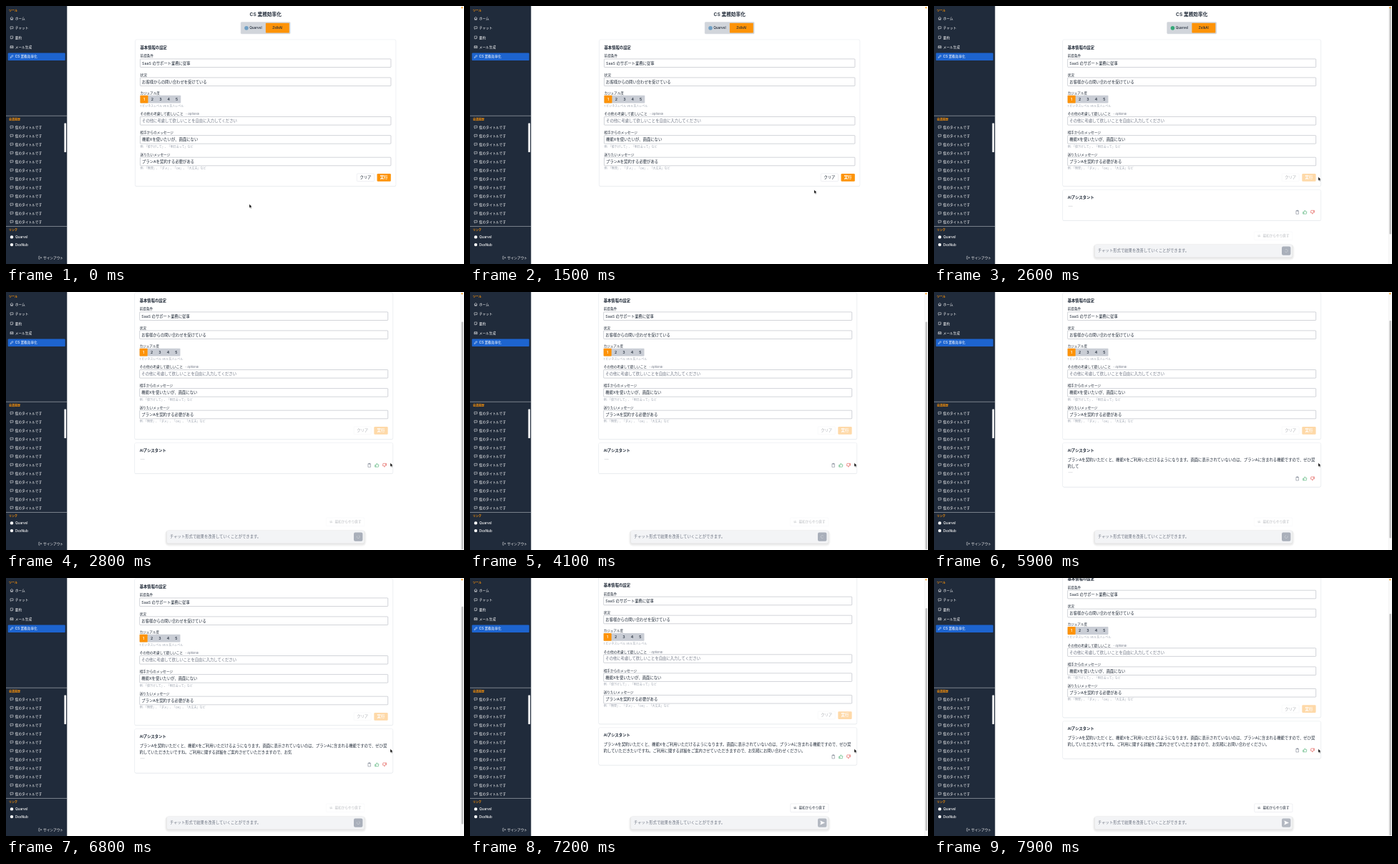
An HTML page for the animation above (8000 ms loop, 640x360 px).

```html
<!DOCTYPE html>
<html lang="ja">
<head>
<meta charset="utf-8">
<title>CS 業務効率化</title>
<style>
html, body { margin: 0; width: 100%; height: 100%; overflow: hidden; background: #fff; }
svg { display: block; width: 100vw; height: 100vh; font-family: Inter, "Noto Sans CJK JP", sans-serif; }
text { white-space: pre; }
</style>
</head>
<body>
<svg viewBox="0 0 640 360" xmlns="http://www.w3.org/2000/svg">
  <g id="page"><g id="form"></g><g id="answer"></g></g>
  <g id="chat"></g>
  <g id="scrollbar"></g>
  <g id="sidebar"></g>
  <circle cx="637.3" cy="2.3" r="1.1" fill="#ff9500"/>
  <path id="cursor" d="M0 0V5.2L1.2 4.1 2 6 2.9 5.6 2.1 3.8H3.7Z" fill="#000" stroke="#fff" stroke-width=".35"/>
</svg>
<script>
const LOOP = 8000, SUBMIT = 2500, DONE = 7150, LINE = 28 / 3;
const INK = '#1f2937', NAVY = '#202b3b', ORANGE = '#fd9308', MUTED = '#9ca3af', EDGE = '#d7dae0';
const SMALL = 4, LABEL = 14 / 3, BODY = 16 / 3, TITLE = 20 / 3;
const ANSWER = [
  'プランAを契約いただくと、機能Xをご利用いただけるようになります。画面に表示されていないのは、プランAに含まれる機能ですので、ぜひ契',
  '約していただきたいですね。ご利用に関する詳細をご案内させていただきますので、お気軽にお問い合わせください。'
];
const TYPING = [[4250, 0], [5000, 32], [6800, 106], [7120, 119]];
const CURSOR_X = [[1300, 340], [1500, 480.5], [1700, 562], [1950, 545], [2250, 537]];
const CURSOR_Y = [[1300, 276.5], [1500, 256.5], [1700, 247], [1950, 240], [2250, 238.5]];

const el = id => document.getElementById(id);
const cache = {};
function set(id, html) {
  if (cache[id] !== html) el(id).innerHTML = cache[id] = html;
}

// y is the vertical middle of the line
const text = (x, y, str, size = BODY, fill = INK, more = '') =>
  `<text x="${x}" y="${y + size * 0.36}" font-size="${size}" fill="${fill}" ${more}>${str}</text>`;
const rect = (x, y, w, h, fill, r = 0, more = '') =>
  `<rect x="${x}" y="${y}" width="${w}" height="${h}" rx="${r}" fill="${fill}" ${more}/>`;
const outlined = (x, y, w, h, r = 1.3, stroke = EDGE, fill = '#fff') =>
  rect(x, y, w, h, fill, r, `stroke="${stroke}" stroke-width=".4"`);
const dot = (x, y, r, fill) => `<circle cx="${x}" cy="${y}" r="${r}" fill="${fill}"/>`;
const icon = (x, y, d, color = '#fff', more = '') =>
  `<path transform="translate(${x} ${y})" d="${d}" fill="none" stroke="${color}" stroke-width=".5" stroke-linejoin="round" ${more}/>`;
const card = (x, y, w, h) =>
  rect(x, y + 0.5, w, h, '#e4e6ea', 2) + outlined(x, y, w, h, 2, '#dfe2e7');
const BOLD = 'font-weight="600"', MEDIUM = 'font-weight="500"', CENTER = 'text-anchor="middle"';

const keyed = (points, t) => {
  if (t <= points[0][0]) return points[0][1];
  for (let i = 1; i < points.length; i++) {
    const [t0, a] = points[i - 1], [t1, b] = points[i];
    if (t < t1) return a + (b - a) * (t - t0) / (t1 - t0);
  }
  return points[points.length - 1][1];
};
const ease = (t, from, to) => {
  const p = Math.min(1, Math.max(0, (t - from) / (to - from)));
  return p * p * (3 - 2 * p);
};

const ICONS = {
  home: 'M-2.2 0L0-2 2.2 0M-1.5-.4V2H1.5V-.4M-.4 2V.7H.4V2',
  bubble: 'M-2-1.7H2V1H-.3L-1.4 2V1H-2Z',
  note: 'M-1.7-1.8H1.7V.8L.7 1.8H-1.7ZM.7 1.8V.8H1.7',
  mail: 'M-2-1.5H2V1.5H-2ZM-2-1L0 .4 2-1M-.9 0L-2 1.3M.9 0L2 1.3',
  pen: 'M-2 2L-1.5.5 1-2 2-1-.5 1.5ZM.3-1.3L1.3-.3',
  exit: 'M-.4-2H-1.8V2H-.4M-.5 0H2M1-1L2 0 1 1',
  clipboard: 'M-1.8-2H1.8V2.6H-1.8ZM-.8-2.6H.8V-1.5H-.8Z',
  thumb: 'M-2.7-.3H-1.5V2.4H-2.7ZM-1.5-.1L-.1-2.6Q.9-2.6.5-.7H2.6L2 2.4H-1.5',
  redo: 'M-2-.7H1.3L.4-1.6M2 .7H-1.3L-.4 1.6'
};

function sidebar() {
  const menu = [['home', 'ホーム'], ['bubble', 'チャット'], ['note', '要約'], ['mail', 'メール生成'], ['pen', 'CS 業務効率化']];
  const entry = (shape, label, y) => icon(8, y, ICONS[shape]) + text(12.8, y, label, LABEL, '#fff', MEDIUM);
  const section = (label, y) => text(4, y, label, SMALL, ORANGE, BOLD);
  const divider = y => rect(0, y, 85.3, 0.45, '#e5e7eb');
  let out = rect(0, 0, 85.3, 360, NAVY) + rect(2.7, 65.4, 80, 10.7, '#1d64cf', 1.2);
  out += section('ツール', 6.4) + section('会話履歴', 158.2) + section('リンク', 312.6);
  menu.forEach(([shape, label], i) => out += entry(shape, label, 17.2 + i * 13.33));
  out += divider(152.9) + divider(307);
  for (let i = 0; i < 12; i++) out += entry('bubble', '仮のタイトルです', 169 + i * 12);
  out += rect(81.4, 163.5, 2.7, 40.5, '#fff', 0.4);
  ['Quarvel', 'DexNub'].forEach((label, i) => {
    const y = 322.4 + i * 10.7;
    out += dot(8, y, 2.2, '#fff') + text(13, y, label, LABEL, '#fff', MEDIUM);
  });
  return out + icon(47.7, 351.2, ICONS.exit) + text(52, 351.2, 'サインアウト', LABEL, '#fff', MEDIUM);
}

function column(sent) {
  const mid = sent ? 360.2 : 362.7, width = sent ? 361 : 364.4;
  return { mid, width, left: mid - width / 2, right: mid + width / 2 };
}

function form(sent) {
  const { mid, width, left, right } = column(sent), x = left + 7;
  const label = (y, str) => text(x, y, str, LABEL);
  const hint = (y, str) => text(x, y, str, SMALL, MUTED);
  const input = (y, str, color = INK) =>
    outlined(x, y - 5.8, width - 14, 11.6, 0.8, '#8d949f') + text(x + 2.6, y, str, BODY, color);

  let out = text(mid, 11.2, 'CS 業務効率化', TITLE, INK, BOLD + CENTER);
  out += outlined(mid - 34.5, 22.6, 69, 16.2, 1.2, '#c8ccd3', '#d1d5db');
  out += rect(mid + 0.2, 23.8, 32.9, 13.7, ORANGE, 0.8);
  out += dot(mid - 26.7, 30.8, 2.8, sent ? '#36a878' : '#6f9fc4');
  out += text(mid - 22.5, 30.8, 'Quarvel', LABEL, INK, MEDIUM);
  out += text(mid + 16.6, 30.8, 'ZelkAI', LABEL, INK, MEDIUM + CENTER);

  out += card(left, 46.9, width, 204.6) + text(x, 57.6, '基本情報の設定', BODY, INK, BOLD);
  out += label(69.8, '前提条件') + input(79.7, 'SaaS のサポート業務に従事');
  out += label(96, '状況') + input(105.7, 'お客様からの問い合わせを受けている');

  out += label(121, 'カジュアル度') + rect(x, 124.8, 56.8, 10.8, '#c9cdd5', 0.8);
  out += rect(x, 124.8, 11, 10.8, ORANGE, 0.8);
  for (let i = 0; i < 5; i++)
    out += text(x + 5.5 + i * 11.4, 130.2, i + 1, BODY, i ? INK : '#fff', MEDIUM + CENTER);
  out += hint(139.5, '1:ビジネスレベル vs 5:友人レベル');

  out += label(150.7, 'その他の考慮して欲しいこと');
  out += text(x + 63.5, 150.9, '- Optional', SMALL, '#6b7280', 'font-style="italic"');
  out += input(160.3, 'その他に考慮して欲しいことを自由に入力してください', '#6b7280');
  out += label(176.6, '相手からのメッセージ') + input(186.4, '機能Xを使いたいが、画面にない');
  out += hint(196.1, '例: 「値下げして」、「明日会って」など');
  out += label(207.4, '送りたいメッセージ') + input(217, 'プランAを契約する必要がある');
  out += hint(226.7, '例: 「無理」、「ダメ」、「OK」、「大丈夫」など');

  out += `<g opacity="${sent ? 0.35 : 1}">` + outlined(right - 54.6, 233.9, 24.2, 10.8)
    + text(right - 42.5, 239.3, 'クリア', BODY, INK, CENTER)
    + rect(right - 26.4, 233.9, 19.3, 10.8, ORANGE, 1.3)
    + text(right - 16.8, 239.3, '実行', BODY, '#fff', BOLD + CENTER) + '</g>';
  return out;
}

const answerRows = (chars, done) => (chars > 0) + (chars > ANSWER[0].length) + (done ? 0 : 1);

function answer(chars, done) {
  const { left, right, width } = column(true), x = left + 7;
  const rows = answerRows(chars, done), first = ANSWER[0].length;
  const grow = (rows - 1) * LINE, iconY = 287.7 + grow;
  let out = card(left, 256.4, width, 43 + grow) + text(x, 267, 'AIアシスタント', BODY, INK, BOLD);
  out += text(x, 279.6, ANSWER[0].slice(0, chars));
  if (chars > first) out += text(x, 279.6 + LINE, ANSWER[1].slice(0, chars - first));
  if (!done) for (let i = 0; i < 3; i++) out += dot(x + 2.2 + i * 2, 279.2 + grow, 0.38, '#4b5563');
  out += icon(right - 33, iconY, ICONS.clipboard, '#6b7280');
  out += icon(right - 22.4, iconY, ICONS.thumb, '#2fa35b');
  return out + `<g transform="rotate(180 ${right - 11.8} ${iconY})">`
    + icon(right - 11.8, iconY, ICONS.thumb, '#dc3a35') + '</g>';
}

function chat(done, t) {
  let out = `<g opacity="${done ? 1 : 0.3}">` + outlined(447.7, 315, 53.2, 11.7)
    + icon(454.2, 320.8, ICONS.redo, INK) + text(459.4, 320.8, '最初からやり直す', LABEL) + '</g>';
  for (let i = 5; i > 0; i--)
    out += rect(225 - i * 0.7, 333.2 - i * 0.3, 275.4 + i * 1.4, 18 + i * 1.1, '#000', 2 + i, 'opacity=".018"');
  out += rect(225, 332.5, 275.4, 18, '#f3f4f6', 2);
  out += text(229, 341.5, 'チャット形式で結果を改善していくことができます。', BODY, '#6b7280');
  out += rect(486, 335.4, 12.4, 12.4, done ? '#b4b9c2' : '#a9afba', 2);
  return out + (done
    ? '<path d="M489.3 338.6L496 341.6 489.3 344.6 490.3 341.6Z" fill="#fff"/>'
    : `<circle cx="492.2" cy="341.6" r="2" fill="none" stroke="#d1d5db" stroke-width=".6" stroke-dasharray="9.4 3.2"
        transform="rotate(${Math.round(t * 0.36) % 360} 492.2 341.6)"/>`);
}

function scrollbar(scroll, rows) {
  const height = 406 + (rows - 1) * LINE + (scroll > 50 ? 1.4 : 0);
  return rect(635.1, 0, 4.9, 360, '#fafafa') + rect(635.1, 0, 0.3, 360, '#e8e8e8')
    + rect(636.4, scroll * 360 / height + 0.7, 2.6, 360 * 360 / height - 1.4, '#c1c1c1', 1.3);
}

function draw() {
  const t = performance.now() % LOOP;
  const sent = t >= SUBMIT, done = t >= DONE;
  const chars = Math.floor(keyed(TYPING, t));
  const scroll = 46 * ease(t, 2600, 2790) + 10.7 * ease(t, DONE, DONE + 200);
  set('form', form(sent));
  set('answer', sent ? answer(chars, done) : '');
  set('chat', sent ? chat(done, t) : '');
  set('scrollbar', sent ? scrollbar(scroll, answerRows(chars, done)) : '');
  el('page').setAttribute('transform', `translate(0 ${-scroll})`);
  el('cursor').setAttribute('transform', `translate(${keyed(CURSOR_X, t)} ${keyed(CURSOR_Y, t)})`);
  requestAnimationFrame(draw);
}

set('sidebar', sidebar());
draw();
</script>
</body>
</html>
```
